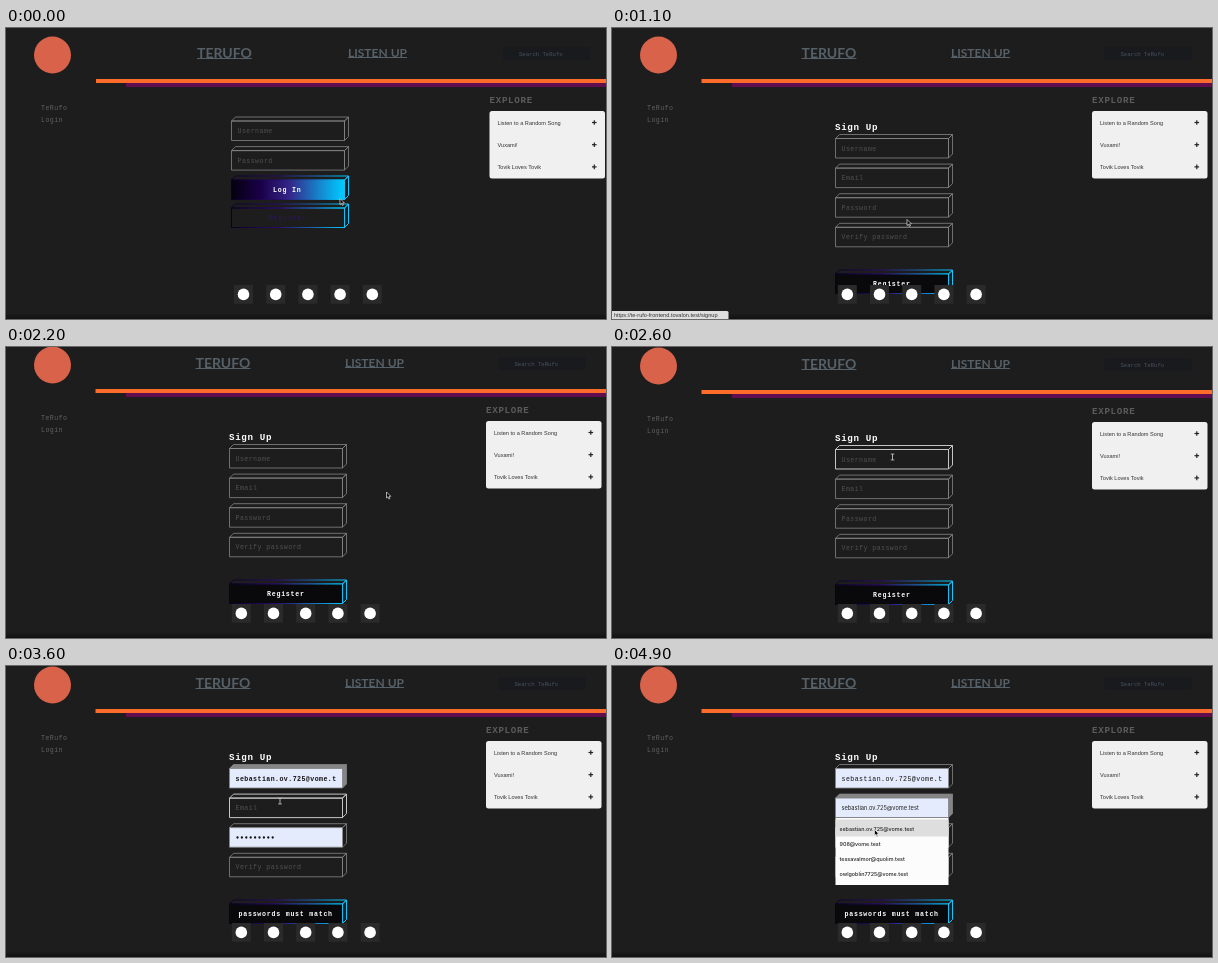
These frames come from a looping animation (600 px wide and 291 px high, 5000 ms). An HTML page with a canvas:

```html
<!DOCTYPE html>
<html lang="en">
<head>
<meta charset="utf-8">
<title>Sign up</title>
<style>
html, body { margin: 0; width: 100%; height: 100%; overflow: hidden; background: #1d1d1d; }
canvas { display: block; width: 600px; height: 291px; }
</style>
</head>
<body>
<canvas id="stage"></canvas>
<script>
const W = 600, H = 291, LOOP = 5000, STEP = 100;
const MONO = '"Courier New", "Liberation Mono", monospace';
const ARIAL = 'Arial, "Liberation Sans", sans-serif';
const UI = 'Inter, sans-serif';
const TITLE = 'Lato, sans-serif';

const EMAIL = 'sebastian.ov.725@vome.test';
const SAVED = [EMAIL, '908@vome.test', 'tessavalmor@quolim.test', 'owlgoblin7725@vome.test'];
const EXPLORE = ['Listen to a Random Song', 'Vuxami!', 'Tovik Loves Tovik'];
const FIELDS = ['Username', 'Email', 'Password', 'Verify password'];

// Event times in ms
const OVER_REGISTER = 300, SIGNUP = 800, STATUS_OFF = 1400;
const OVER_NAME = 2500, FOCUS_NAME = 2800, LIST_NAME = 2900, PREVIEW_NAME = 3200, FILL_NAME = 3400;
const FOCUS_EMAIL = 4000, LIST_EMAIL = 4200, PREVIEW_EMAIL = 4500;

const POINTER = [
  [100, 334, 170.5], [500, 295, 191.5], [1300, 295, 191.5], [1700, 380.5, 145],
  [2200, 380.5, 145], [2600, 280.5, 110], [2900, 280.5, 110], [3200, 274, 135],
  [3700, 274, 135], [4000, 267, 142], [4300, 267, 142], [4600, 262.5, 163.5]
];
const SCROLL = [[1900, 0], [2200, -9], [2500, -9], [2600, -8]];

const canvas = document.getElementById('stage');
const ctx = canvas.getContext('2d');
const dpr = window.devicePixelRatio || 1;
canvas.width = W * dpr;
canvas.height = H * dpr;

function track(keys, t, col = 1) {
  if (t <= keys[0][0]) return keys[0][col];
  for (let i = 1; i < keys.length; i++) {
    const a = keys[i - 1], b = keys[i];
    if (t < b[0]) {
      const p = (t - a[0]) / (b[0] - a[0]);
      return a[col] + (b[col] - a[col]) * p * p * (3 - 2 * p);
    }
  }
  return keys[keys.length - 1][col];
}

function rect(x, y, w, h, color, r = 0) {
  ctx.fillStyle = color;
  ctx.beginPath();
  ctx.roundRect(x, y, w, h, r);
  ctx.fill();
}

function disc(x, y, r, color) {
  ctx.fillStyle = color;
  ctx.beginPath();
  ctx.arc(x, y, r, 0, Math.PI * 2);
  ctx.fill();
}

function poly(points, fill, stroke, width = 0.8) {
  ctx.beginPath();
  points.forEach(([x, y]) => ctx.lineTo(x, y));
  ctx.closePath();
  if (fill) { ctx.fillStyle = fill; ctx.fill(); }
  if (stroke) { ctx.strokeStyle = stroke; ctx.lineWidth = width; ctx.stroke(); }
}

function text(str, x, y, size, color, family, weight = 400, spacing = 0) {
  ctx.font = `${weight} ${size}px ${family}`;
  ctx.letterSpacing = spacing + 'px';
  ctx.fillStyle = color;
  ctx.fillText(str, x, y);
  return ctx.measureText(str).width;
}

const mono = (str, x, y, color, weight, spacing = 0.44) =>
  text(str, x, y, 6.6, color, MONO, weight, spacing);

function link(str, x, y, size, color) {
  const w = text(str, x, y, size, color, TITLE, 700);
  rect(x, y + 0.5, w, 1, color);
}

function ramp(x, stops) {
  const g = ctx.createLinearGradient(x, 0, x + 117, 0);
  stops.forEach(([p, c]) => g.addColorStop(p, c));
  return g;
}
const edgeRamp = x => ramp(x, [[0, '#0a0024'], [0.4, '#2a0a6c'], [0.7, '#1b66b4'], [0.92, '#00bdf6'], [1, '#12c8ff']]);
const fillRamp = x => ramp(x, [[0, '#05000f'], [0.25, '#1a0048'], [0.5, '#34278a'], [0.75, '#1685cc'], [0.95, '#00c8ff']]);

// Box with a thin raised top and right side
function prism(x, y, stroke, { fill, side, width = 0.8 } = {}) {
  const w = 113, h = 19.5, d = 4;
  poly([[x, y], [x + d, y - d], [x + w + d, y - d], [x + w, y]], side, stroke, width);
  poly([[x + w, y], [x + w + d, y - d], [x + w + d, y + h - d], [x + w, y + h]], side, stroke, width);
  poly([[x, y], [x + w, y], [x + w, y + h], [x, y + h]], fill, stroke, width);
}

function button(label, x, y, labelX, hot) {
  prism(x, y, edgeRamp(x), { fill: hot ? fillRamp(x) : null, width: 1 });
  mono(label, labelX, y + 12, hot ? '#fff' : '#2c1760', hot ? 700 : 400, 0.8);
}

function header(wide) {
  disc(46.5, 27, 18.5, '#d9634a');
  link('TERUFO', wide ? 191 : 189.5, 29.5, 14, '#566068');
  link('LISTEN UP', wide ? 342 : 339, 28.5, 12, '#566068');
  rect(wide ? 497 : 492.5, 19, 87, 13, '#191a1e', 1);
  text('Search TeRufo', wide ? 513 : 508.5, 27.8, 5.6, '#46525e', MONO);
  rect(120, 55, 480, 4, '#620d50');
  rect(wide ? 90 : 89.5, 51, 511, 4, '#fd6c2a');
  mono('TeRufo', 35, 82.3, '#606060');
  mono('Login', 35, 94.2, '#606060');
}

function explore(x) {
  text('EXPLORE', x, 75, 9.2, '#5c5c5c', MONO, 700, 0.68);
  rect(x, 83, 115.5, 67.5, '#f0f0f0', 2.5);
  EXPLORE.forEach((label, i) => {
    const y = 94.5 + i * 22.2;
    text(label, x + 8, y + 2, 5.6, '#333', ARIAL);
    rect(x + 102.5, y - 0.6, 4.6, 1.2, '#222');
    rect(x + 104.2, y - 2.3, 1.2, 4.6, '#222');
  });
}

function loginForm(t) {
  const x = 225.5;
  ['Username', 'Password'].forEach((label, i) => {
    const y = 93 + i * 29.6;
    prism(x, y, '#858585');
    mono(label, x + 6, y + 12, '#505050');
  });
  const over = t >= OVER_REGISTER;
  button('Log In', x, 152, 267, !over);
  button('Register', x, 180, 263, over);
}

function savedList(x, y, picked) {
  rect(x, y, 113, 67, '#fcfcfc');
  if (picked) rect(x, y + 1.5, 113, 17, '#dedede');
  SAVED.forEach((s, i) => text(s, x + 4, y + 13 + i * 15.1, 5.4, '#222', UI, 500));
}

function signupForm(t) {
  const x = 223.5, pale = '#e4ebfc', gray = '#858585';
  const active = t >= FOCUS_EMAIL ? 1 : t >= FOCUS_NAME ? 0 : -1;
  const hovered = t >= FILL_NAME ? 1 : t >= OVER_NAME && t < PREVIEW_NAME ? 0 : -1;
  const filled = [t >= PREVIEW_NAME, t >= PREVIEW_EMAIL, t >= PREVIEW_NAME, false];

  text('Sign Up', 223, 102, 9.2, '#fff', MONO, 700, 0.66);
  FIELDS.forEach((label, i) => {
    const y = 110.5 + i * 29.6;
    const solid = i === active && filled[i];
    const lit = !solid && (i === hovered || i === active);
    prism(x, y, lit ? '#c4c4c4' : gray, {
      fill: filled[i] ? pale : null,
      side: solid ? gray : null,
      width: lit ? 1 : 0.8
    });
    if (!filled[i]) {
      mono(label, x + 6, y + 12, '#505050');
    } else if (i === 2) {
      for (let k = 0; k < 9; k++) disc(x + 8 + k * 4.4, y + 9.8, 1.15, '#111');
    } else if (i === 1 || t < FILL_NAME) {
      text(EMAIL, x + 6, y + 12, 5.7, '#222', UI);
    } else {
      ctx.save();
      ctx.beginPath();
      ctx.rect(x, y, 107, 20);
      ctx.clip();
      mono(EMAIL, x + 6, y + 12, '#111', active === 0 ? 700 : 400);
      ctx.restore();
    }
  });

  prism(x, 246, edgeRamp(x), { fill: '#09090c', width: 1 });
  if (t >= FILL_NAME) mono('passwords must match', 232.5, 258, '#fff', 700, 0.76);
  else mono('Register', 261, 258, '#fff', 700, 0.76);

  if (t >= LIST_NAME && t < FILL_NAME) savedList(x, 130.5, t >= PREVIEW_NAME);
  if (t >= LIST_EMAIL) savedList(x, 160, t >= PREVIEW_EMAIL);
}

function socials(x) {
  for (let i = 0; i < 5; i++) {
    const cx = x + i * 32.2;
    rect(cx - 9.5, 257, 19, 18.7, '#2a2a2a');
    disc(cx, 266.4, 5.8, '#fff');
  }
}

function pointer(t) {
  const x = track(POINTER, t, 1), y = track(POINTER, t, 2);
  const beam = (t >= OVER_NAME && t < 3000) || (t >= FILL_NAME && t < 4400);
  if (beam) {
    rect(x - 0.5, y - 3, 1, 6, '#b4b4b4');
    rect(x - 1.8, y - 3.4, 3.6, 0.9, '#b4b4b4');
    rect(x - 1.8, y + 2.5, 3.6, 0.9, '#b4b4b4');
    return;
  }
  const shape = [[0, 0], [0, 6], [1.4, 4.8], [2.4, 7], [3.4, 6.5], [2.5, 4.4], [4.3, 4.3]];
  poly(shape.map(([dx, dy]) => [x + dx, y + dy]), '#000', '#e8e8e8', 0.7);
}

function draw(t) {
  const wide = t < SIGNUP;
  ctx.setTransform(dpr, 0, 0, dpr, 0, 0);
  rect(0, 0, W, H, '#1d1d1d');

  ctx.save();
  ctx.translate(0, track(SCROLL, t));
  header(wide);
  explore(wide ? 483.5 : 480);
  if (wide) loginForm(t); else signupForm(t);
  ctx.restore();

  socials(wide ? 237.5 : 235.3);
  const shade = ctx.createLinearGradient(0, 285, 0, H);
  shade.addColorStop(0, 'rgba(0,0,0,0)');
  shade.addColorStop(1, 'rgba(0,0,0,0.4)');
  rect(0, 285, W, 6, shade);

  if (t >= OVER_REGISTER + 100 && t < STATUS_OFF) {
    rect(0, 283, 116.5, 8, '#dedede', [0, 1.5, 0, 0]);
    text('https://te-rufo-frontend.tovalon.test/signup', 2, 289, 5.6, '#333', ARIAL);
  }
  pointer(t);
}

function tick() {
  const t = performance.now() % LOOP;
  draw(Math.floor(t / STEP) * STEP);
  requestAnimationFrame(tick);
}
tick();
</script>
</body>
</html>
```
